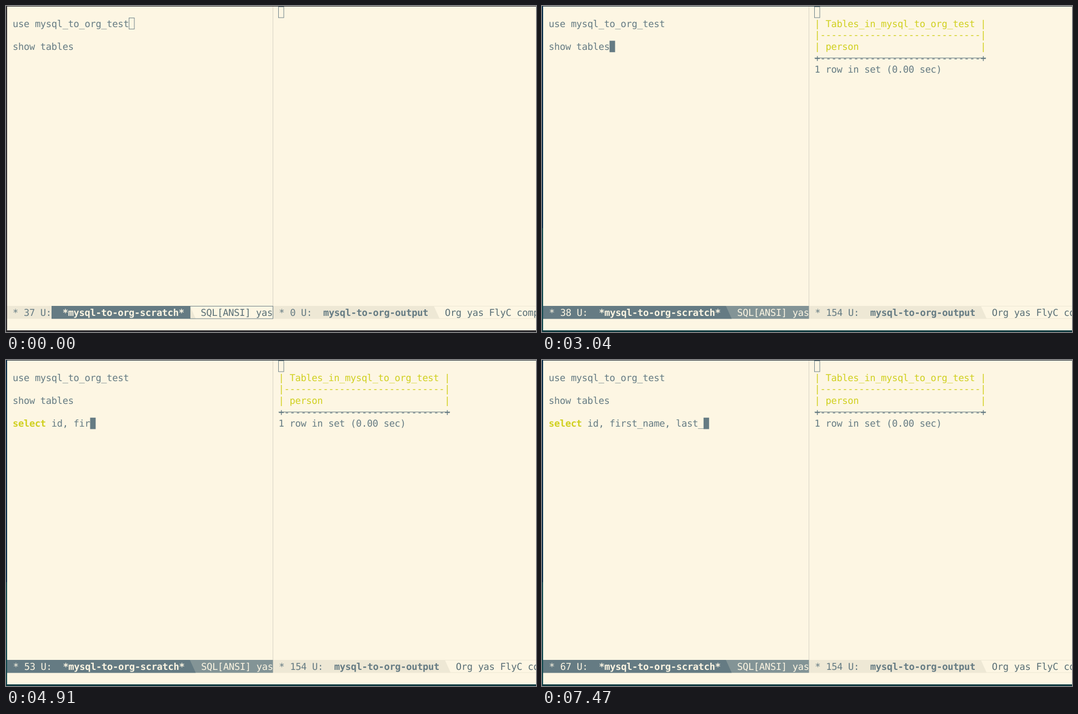
Animation of 954x587 px, one loop 8000 ms. Source, as an HTML page with a canvas:

```html
<!DOCTYPE html>
<html lang="en">
<head>
<meta charset="utf-8">
<style>
  html, body { margin: 0; width: 100%; height: 100%; overflow: hidden; }
  canvas { display: block; }
</style>
</head>
<body>
<canvas id="stage" width="954" height="587"></canvas>
<script>
const ctx = document.getElementById('stage').getContext('2d');
// The editor uses 14 x 29 character cells and a 24 px font, shown at SCALE.
const LOOP = 8000, SCALE = 0.711;
const CELL = 14 * SCALE, ROW = 29 * SCALE, ASCENT = 23 * SCALE, FONT = 24 * SCALE;
const TOP = SCALE, LEFT = 17 * SCALE, RIGHT = 690 * SCALE;
const BAR_TOP = 540, BAR_BOTTOM = 563.3, BAR_BASE = 785 * SCALE;
const CREAM = '#fdf6e3', BEIGE = '#eee8d5', SLATE = '#657b83',
      GREY = '#839496', DARK = '#586e75', LIME = '#d0d020';

// One chunk is entered per key time; the completion inserts "name" at once.
const chunks = [...'\n\nselect id, first_', 'name', ...', last_'];
const keys = [3040, 3150, 3270, 3450, 3490, 3600, 3640, 3840, 3880,
  4080, 4190, 4300, 4340, 4560, 4830, 4870, 5070, 5220, 5460,
  6440, 6670, 6710, 6910, 6950, 6990, 7220, 7430];
// The text is repainted shortly after the size counter.
const paints = keys.map(k => k === 5070 ? k : k + 40);
const typed = (times, t) => chunks.slice(0, times.filter(k => t >= k).length).join('');

const rowTop = row => TOP + row * ROW;

function rect(x, y, w, h, color) {
  ctx.fillStyle = color;
  ctx.fillRect(x, y, w, h);
}

function text(str, x, y, color = SLATE, bold = false) {
  ctx.font = `${bold ? 'bold ' : ''}${FONT}px "DejaVu Sans Mono", monospace`;
  ctx.fillStyle = color;
  ctx.fillText(str, x, y);
}

const line = (str, x, row, color, bold) => text(str, x, rowTop(row) + ASCENT, color, bold);

function outline(x, y, w, h) {
  ctx.strokeStyle = SLATE;
  ctx.lineWidth = 0.9;
  ctx.strokeRect(Math.round(x) + 0.5, Math.round(y) + 0.5, w, h);
}

// Bar section from x0 whose right edge slants from x1 to x1 + 10.
function slanted(x0, x1, color) {
  ctx.fillStyle = color;
  ctx.beginPath();
  ctx.moveTo(x0, BAR_TOP);
  ctx.lineTo(x1, BAR_TOP);
  ctx.lineTo(x1 + 10.5, BAR_BOTTOM);
  ctx.lineTo(x0, BAR_BOTTOM);
  ctx.fill();
}

function barText(x, size, name, modes, colors) {
  const head = `* ${size} U:`, nameCol = head.length + 2;
  text(head, x, BAR_BASE, colors[0]);
  text(name, x + nameCol * CELL, BAR_BASE, colors[1], true);
  text(modes, x + (nameCol + name.length + 3) * CELL, BAR_BASE, colors[2]);
}

function leftBar(size, focused) {
  const h = BAR_BOTTOM - BAR_TOP;
  if (focused) {
    rect(2, BAR_TOP, 478.5, h, GREY);
    slanted(2, 331, SLATE);
  } else {
    rect(2, BAR_TOP, 80, h, BEIGE);
    slanted(331, 331, BEIGE);
    rect(82, BAR_TOP, 249, h, SLATE);
    outline(331, BAR_TOP, 149, 22.5);
  }
  barText(focused ? LEFT + SCALE : LEFT, size, '*mysql-to-org-scratch*', 'SQL[ANSI] yas',
    focused ? [CREAM, CREAM, CREAM] : [SLATE, CREAM, DARK]);
}

function rightBar(size) {
  rect(481, BAR_TOP, 473, 1, BEIGE);
  rect(481, BAR_BOTTOM - 1, 473, 1, BEIGE);
  slanted(481, RIGHT + SCALE + (String(size).length + 27) * CELL, BEIGE);
  barText(RIGHT + SCALE, size, 'mysql-to-org-output', 'Org yas FlyC company', [SLATE, SLATE, DARK]);
}

function output(t) {
  if (t >= 2580) {
    line('| Tables_in_mysql_to_org_test |', RIGHT, 1, LIME);
    line(`|${'-'.repeat(29)}|`, RIGHT, 2, LIME);
    line(`| ${'person'.padEnd(28)}|`, RIGHT, 3, LIME);
    line(`+${'-'.repeat(29)}+`, RIGHT, 4);
    rect(RIGHT, rowTop(4) + 14 * SCALE, 31 * CELL, 1, SLATE);
    line('1 row in set (0.00 sec)', RIGHT, 5);
  } else if (t >= 1190) {
    line('Database changed', RIGHT, 0);
  }
  outline(490, 1, 9.5, 19.5);
}

function cursor(t, typedRow, typedCol) {
  const [row, col] = t < 1790 ? [1, 21] : t < 1910 ? [2, 0] : [typedRow, typedCol];
  const x = LEFT + col * CELL;
  if (t < 200) return outline(x, rowTop(row), 9.5, 20);
  const hidden = (t >= 700 && t < 1150) || (t >= 1630 && t < 1790) || (t >= 6040 && t < 6090);
  if (!hidden) rect(x, rowTop(row), CELL, ROW, SLATE);
}

function query(t) {
  line('use mysql_to_org_test', LEFT, 1);
  line('show tables', LEFT, 3);
  const rows = typed(paints, t).split('\n');
  const last = rows[rows.length - 1];
  const row = 2 + rows.length;
  const col = rows.length > 1 ? last.length : 11;
  if (last.startsWith('select')) {
    line('select', LEFT, row, LIME, true);
    line(last.slice(6), LEFT + 6 * CELL, row);
  } else {
    line(last, LEFT, row);
  }
  const hint = t >= 6040 && t < 6480 ? (t < 6090 ? 'n' : 'name') : '';
  const x = LEFT + col * CELL;
  if (hint) {
    rect(x, rowTop(row), hint.length * CELL, ROW, BEIGE);
    line(hint, x, row, DARK);
    rect(x, rowTop(row) + 25 * SCALE, hint.length * CELL, 1, DARK);
  }
  cursor(t, row, col);
  if (hint.length > 1) line('n', x, row, CREAM);
}

function edges(focused) {
  rect(0, 0, 954, 1, focused ? '#26343c' : '#2b2a2e');
  rect(0, 0, 2, 400, focused ? '#062c48' : '#2b2a2e');
  rect(0, 400, 2, 187, focused ? '#12494f' : '#2b2a2e');
  rect(0, 584, 954, 3, focused ? '#123c42' : '#2b2a2e');
}

function draw(t) {
  const focused = t >= 200;
  rect(0, 0, 954, 587, CREAM);
  rect(480, 1, 1, 562, '#d9d5c6');
  query(t);
  output(t);
  rightBar(t < 1230 ? 0 : t < 2630 ? 17 : 154);
  leftBar(37 + typed(keys, t).length, focused);
  edges(focused);
}

ctx.textRendering = 'geometricPrecision';
// Advances are rounded down to whole cells, so letters sit slightly tighter.
ctx.font = `${FONT}px "DejaVu Sans Mono", monospace`;
ctx.letterSpacing = `${CELL - ctx.measureText('0').width}px`;
const start = performance.now();
function tick() {
  draw((performance.now() - start) % LOOP);
  requestAnimationFrame(tick);
}
tick();
</script>
</body>
</html>
```
